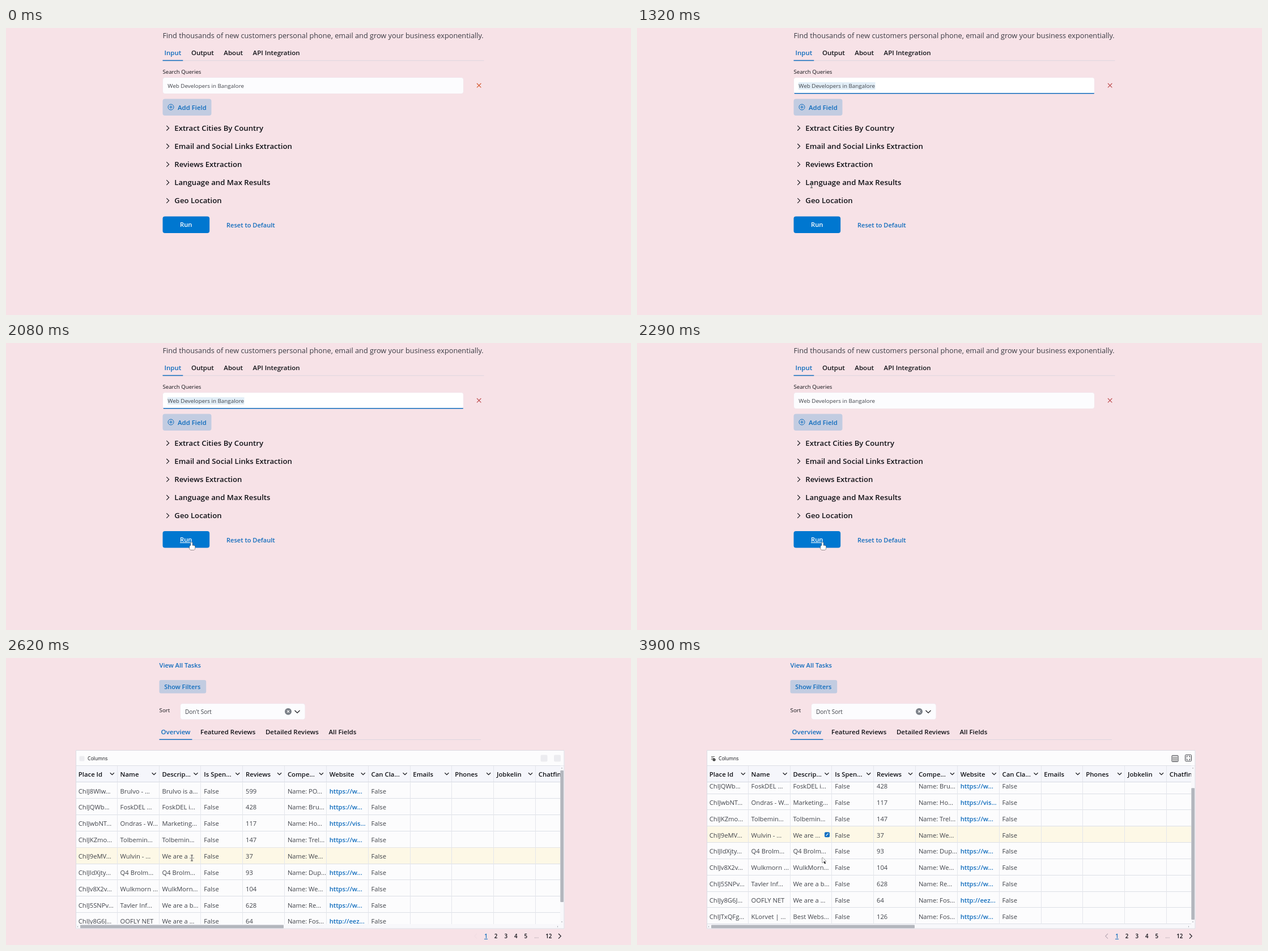
An HTML page with a canvas that plays this animation: 1103x508 px, repeating every 4.43 s.

```html
<!DOCTYPE html>
<html lang="en">
<head>
<meta charset="utf-8">
<title>Search and results</title>
<style>
  html, body { margin: 0; width: 100%; height: 100%; overflow: hidden; background: #f7e2e7; }
  canvas { display: block; width: 1103px; height: 508px; }
</style>
</head>
<body>
<canvas id="stage" width="1103" height="508"></canvas>
<script>
const ctx = document.getElementById('stage').getContext('2d');
const LOOP = 4430;
const T = { settle: 400, focus: 860, pointer: 1320, arrive: 1800, blur: 2220, release: 2430,
            results: 2620, icons: 2760, edit: 2830, scroll: 3900 };
const BLUE = '#0f6cbd', INK = '#101116', SOFT = '#3f4249', LINE = '#dcdfe6';
const FIELD = '#fcfcfe', TINT = '#c2cce1', BAR = '#b3b6bd';

function setFont(size, weight) {
  ctx.font = `${weight} ${size}px "Open Sans", "Noto Sans", sans-serif`;
}

function text(str, x, y, size, color = INK, weight = 400) {
  setFont(size, weight);
  ctx.fillStyle = color;
  ctx.fillText(str, x, y);
}

// Sets labels side by side with an even gap; returns the width of the first.
function flow(labels, x, y, size, gap, color) {
  setFont(size, 600);
  const first = ctx.measureText(labels[0]).width;
  labels.forEach((label, i) => {
    text(label, x, y, size, color(i, label), 600);
    x += ctx.measureText(label).width + gap;
  });
  return first;
}

function rect(x, y, w, h, color, radius = 0) {
  ctx.fillStyle = color;
  ctx.beginPath();
  ctx.roundRect(x, y, w, h, radius);
  ctx.fill();
}

function frame(x, y, w, h, color, radius = 0) {
  ctx.strokeStyle = color;
  ctx.lineWidth = 1;
  ctx.beginPath();
  ctx.roundRect(x, y, w, h, radius);
  ctx.stroke();
}

function stroke(x, y, points, color, width = 1) {
  ctx.strokeStyle = color;
  ctx.lineWidth = width;
  ctx.beginPath();
  for (let i = 0; i < points.length; i += 2) ctx.lineTo(x + points[i], y + points[i + 1]);
  ctx.stroke();
}

function circle(x, y, r, color, filled) {
  ctx.beginPath();
  ctx.arc(x, y, r, 0, Math.PI * 2);
  ctx.fillStyle = ctx.strokeStyle = color;
  ctx.lineWidth = 1;
  filled ? ctx.fill() : ctx.stroke();
}

function cross(x, y, r, color) {
  stroke(x, y, [-r, -r, r, r], color, 1.1);
  stroke(x, y, [r, -r, -r, r], color, 1.1);
}

const chevronDown = (x, y, r) => stroke(x, y, [-r, -r / 2, 0, r / 2, r, -r / 2], INK, 1.1);
const chevronSide = (x, y, dir, color = INK) =>
  stroke(x, y, [-2 * dir, -4.3, 2.3 * dir, 0, -2 * dir, 4.3], color, 1.1);

function field(x, y, w, h, fill = FIELD) {
  rect(x, y, w, h, '#f0e4eb', 4);
  rect(x + .5, y + .5, w - 1, h - 1, fill, 4);
}

function tabs(labels, x, y, width) {
  rect(x, y, width, 1, '#ded5df');
  const active = flow(labels, x + 3, y - 9, 11.5, 17.6, i => i ? INK : BLUE);
  rect(x, y - .6, active + 6, 1.6, BLUE);
}

function beam(x, y, color = '#333') {
  for (const [c, w] of [['#ffffffb0', 2], [color, 1]]) {
    stroke(x, y, [0, -4.5, 0, 4.5], c, w);
    for (const end of [-5, 5]) stroke(x, y + end, [-2, 0, 2, 0], c, w);
  }
}

function hand(x, y) {
  const parts = [[x - 2, y - 7, 3, 10], [x - 4, y - 1, 9.5, 7.5]];
  for (const p of parts) frame(...p, '#333', 2);
  for (const p of parts) rect(...p, '#fff', 2);
}

function arrow(x, y) {
  stroke(x, y, [3, 7, 5, 11], '#333', 2.5);
  const edge = [0, 0, 0, 9.5, 2.5, 7.2, 6.5, 6.7, 0, 0];
  stroke(x, y, edge, '#333');
  ctx.fillStyle = '#fff';
  ctx.fill();
}

// Runs a little past its goal, then settles back.
function easeOutBack(k) {
  const u = k - 1;
  return 1 + 2.7 * u ** 3 + 1.7 * u ** 2;
}

function drawForm(t) {
  const focused = t >= T.focus && t < T.blur;
  const travel = Math.min(Math.max((t - T.pointer) / (T.arrive - T.pointer), 0), 1);
  const px = 308 + 20 * travel, py = 277 + 82 * easeOutBack(travel);
  const hover = t >= T.pointer && py > 333 && py < 363;

  text('Find thousands of new customers personal phone, email and grow your business exponentially.',
       276.5, 18, 12.74, '#3b3c44');
  tabs(['Input', 'Output', 'About', 'API Integration'], 276.5, 57.3, 567);

  text('Search Queries', 276.5, 81, 9.65, INK, 500);
  field(276.5, 87.5, 531, 29, focused ? '#fff' : FIELD);
  if (focused) {
    rect(277.5, 115, 529.5, 1.5, BLUE, 1);
    rect(285, 96, 135.5, 13, '#e2eef7');
  }
  text('Web Developers in Bangalore', 285.3, 106.4, 9.83, SOFT);
  cross(834.7, 101.7, 3.7, t < T.settle ? '#d4572c' : '#bd4a4c');

  rect(276.5, 125.5, 86, 29.5, TINT, 4);
  circle(291, 140, 5, BLUE);
  stroke(291, 140, [-3, 0, 3, 0], BLUE);
  stroke(291, 140, [0, -3, 0, 3], BLUE);
  text('Add Field', 303, 144.8, 11.4, BLUE, 600);

  ['Extract Cities By Country', 'Email and Social Links Extraction', 'Reviews Extraction',
   'Language and Max Results', 'Geo Location'].forEach((label, i) => {
    const y = 177.2 + i * 32.1;
    chevronSide(285.3, y, 1);
    text(label, 297.3, y + 4.8, 13.2, INK, 600);
  });

  const top = hover ? 333 : 333.6;
  rect(276.5, top, 82.7, 29.4, '#0077d0', 4);
  text('Run', 307, top + 18.7, 11.2, '#fff', 600);
  if (hover) rect(307, top + 20, 21.5, 1, '#fff');
  text('Reset to Default', 389, 352.5, 11.05, BLUE, 600);

  if (t < T.pointer) return;
  if (t >= T.release) beam(328, 353, '#6c9fc9');
  else if (hover) hand(px, py + .5);
  else beam(px, py);
}

const COLUMNS = ['Place Id', 'Name', 'Descrip...', 'Is Spen...', 'Reviews', 'Compe...',
                 'Website', 'Can Cla...', 'Emails', 'Phones', 'Jobkelin', 'Chatfin'];
// Place id | name | description | reviews | competitor | website
const ROWS = `8Wlw|Brulvo - ...|Brulvo is a...|599|PO|https://w...
QWb|FoskDEL ...|FoskDEL i...|428|Bru|https://w...
wbNT|Ondras - W...|Marketing...|117|Ho|https://vis...
KZmo|Tolbemin...|Tolbemin...|147|Trel|https://w...
9eMV|Wulvin - ...|We are a ...|37|We|
ldXjty|Q4 Brolm...|Q4 Brolm...|93|Dup|https://w...
v8X2v|Wulkmorn ...|WulkMorn...|104|We|https://w...
5SNPv|Tavler Inf...|We are a b...|628|Re|https://w...
y8G6J|OOFLY NET|We are a ...|64|Fos|http://eez...
TxQFg|KLorvet | ...|Best Webs...|126|Fos|https://w...`
  .split('\n').map(row => row.split(/\|(?! )/));
const COL_W = 73.82, ROW_H = 28.85, LEFT = 123, WIDTH = 855, HEAD = 190.5, BODY = 220.3, BOTTOM = 471;
const colX = i => LEFT + i * COL_W;

function clipped(y, h, paint) {
  ctx.save();
  ctx.beginPath();
  ctx.rect(LEFT, y, WIDTH, h);
  ctx.clip();
  paint();
  COLUMNS.forEach((_, i) => i && rect(Math.round(colX(i)) - 1, y, 1, h, '#e4e6ec'));
  ctx.restore();
}

function drawRows(scroll, editing) {
  ROWS.forEach(([id, name, about, reviews, rival, site], r) => {
    const top = BODY + r * ROW_H - scroll;
    const active = r === 4, edited = active && editing;
    if (active) rect(LEFT, top, WIDTH, ROW_H, '#fdf8e6');
    rect(LEFT, Math.round(top + ROW_H) - 1, WIDTH, 1, LINE);
    const cells = [`ChIJ${id}...`, name, edited ? 'We are ...' : about, 'False',
                   reviews, `Name: ${rival}...`, site, 'False'];
    cells.forEach((cell, c) => {
      const link = cell === site;
      text(cell, colX(c) + 4.8, top + 19.3, 11.2, link ? BLUE : SOFT, link ? 600 : 400);
    });
    if (edited) {
      rect(331, top + 10, 9, 9, '#0f6fc2', 2);
      stroke(335.5, top + 14.5, [-2, 2, 2, -2], '#fff', 1.2);
    }
  });
}

function drawHeader() {
  rect(LEFT, HEAD, WIDTH, BODY - HEAD, '#f5f6fb');
  COLUMNS.forEach((label, i) => {
    text(label, colX(i) + 4.8, 210, 11.35, INK, 600);
    if (i < COLUMNS.length - 1) chevronDown(colX(i) + 64.3, 205, 3.5);
  });
}

function drawToolbarIcons(ready) {
  if (!ready) {
    rect(129.5, 173.5, 9, 9, '#ececf0', 2);
    for (const x of [943.5, 967]) rect(x, 171.5, 12, 12, '#ececf0', 2);
    return;
  }
  for (let i = 0; i < 3; i++) stroke(131, 174.5 + i * 2.5, [0, 0, 6 - i * 2, 0], '#555');
  circle(136, 180, 2.5, '#222', true);
  circle(136, 180, .8, '#fff', true);

  frame(944, 172.5, 11, 11, '#3a3c42', 1);
  for (let i = 0; i < 3; i++) {
    stroke(944, 175.2 + i * 2.7, [0, 0, 11, 0], '#777', .8);
    stroke(946.8 + i * 2.7, 175, [0, 0, 0, 8], '#777', .8);
  }

  frame(967.5, 171.5, 11, 11, '#3a3c42', 1);
  for (const sx of [-1, 1])
    for (const sy of [-1, 1])
      stroke(973, 177, [sx, 3 * sy, 3 * sx, 3 * sy, 3 * sx, sy], '#3a3c42');
}

function drawScrollbars(scroll) {
  rect(978, HEAD, 7, BOTTOM - HEAD, '#f8f8fb');
  rect(978.3, 199 + scroll * .83, 5.7, 233, BAR, 1);
  rect(LEFT, BOTTOM, 862, 8, '#f8f8fb');
  rect(131, 472.5, 359, 6, BAR, 1);
  for (const y of [194.5, 466.5]) rect(980, y, 2, 1, '#9a9da5');
  for (const x of [126, 973]) rect(x, 474.5, 1, 2, '#9a9da5');
}

function drawTable(t) {
  const scroll = t >= T.scroll ? 37.5 : 0;
  rect(LEFT, 163, 862.5, 316.5, '#fcfcfd');
  text('Columns', 144, 181.2, 8.6, INK, 500);
  drawToolbarIcons(t >= T.icons);
  clipped(BODY, BOTTOM - BODY, () => drawRows(scroll, t >= T.edit));
  clipped(HEAD, BODY - HEAD, drawHeader);
  rect(LEFT, 190, 862, 1, LINE);
  rect(LEFT, 219, WIDTH, 1, '#d6dae3');
  drawScrollbars(scroll);
  frame(123.5, 163.5, 861.5, 315.5, '#dcdbe2');
}

function drawPager(ready) {
  chevronSide(829, 492.3, -1, ready ? '#b9aab5' : '#f1dde3');
  flow(['1', '2', '3', '4', '5', '...', '12'], 844.2, 496.2, 9.8, 12,
       (i, label) => label === '...' ? '#b5a9b2' : i ? INK : BLUE);
  rect(844, 497, 6, 1, BLUE);
  chevronSide(977, 492.3, 1);
}

function drawResults(t) {
  text('View All Tasks', 270.5, 16.6, 11.1, BLUE, 600);
  rect(270.5, 39, 82.7, 23.5, TINT, 3);
  text('Show Filters', 279.2, 55, 11, BLUE, 600);
  text('Sort', 270.5, 95.6, 9.8, INK, 500);
  field(307.5, 80.5, 220.5, 28.5);
  text("Don't Sort", 316, 98.8, 10, SOFT);
  circle(498, 94.7, 6, '#7b8088', true);
  cross(498, 94.7, 2, '#fff');
  chevronDown(514, 95, 4.5);
  tabs(['Overview', 'Featured Reviews', 'Detailed Reviews', 'All Fields'], 270.5, 144, 567.5);
  drawTable(t);
  drawPager(t >= T.icons);
  if (t < T.edit) beam(328, 354);
  else arrow(327.2, 353);
}

const start = performance.now();

function draw() {
  const t = (performance.now() - start) % LOOP;
  rect(0, 0, 1103, 508, '#f7e2e7');
  if (t < T.results) drawForm(t);
  else drawResults(t);
  requestAnimationFrame(draw);
}

draw();
</script>
</body>
</html>
```
